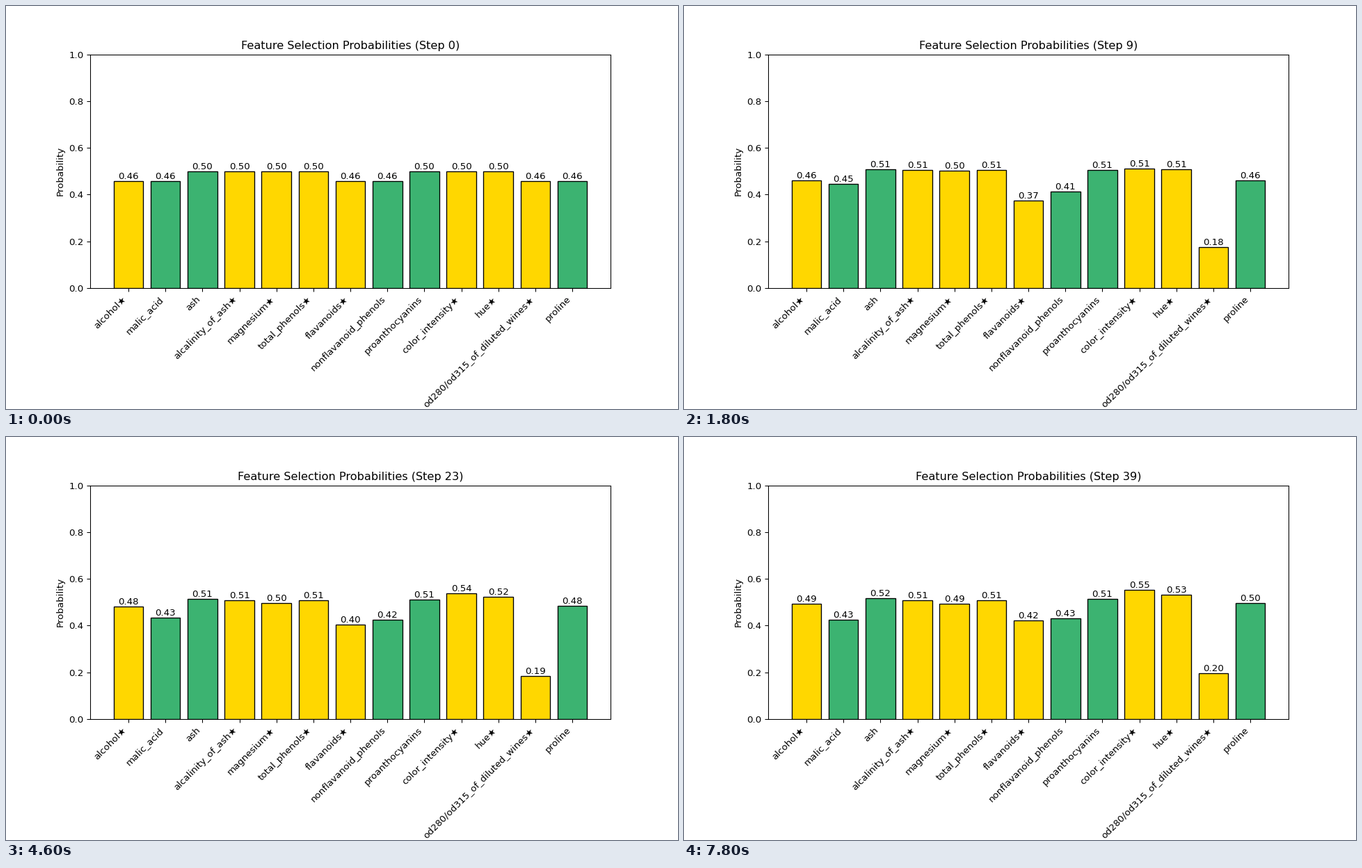
A matplotlib script for the animation above (8000 ms loop, 966x580 px).

```python
import matplotlib.pyplot as plt
import numpy as np
from matplotlib.animation import FuncAnimation

W, H, DPI = 966, 580, 96.6
STEPS, INTERVAL = 40, 200
FALL_TIME = 3      # steps in which the early change decays
DRIFT_START = 6    # step at which the slow drift begins

# name: (level after the early change, final level)
FEATURES = {
    "alcohol★": (.456, .4935),
    "malic_acid": (.4503, .4255),
    "ash": (.5055, .518),
    "alcalinity_of_ash★": (.505, .508),
    "magnesium★": (.503, .493),
    "total_phenols★": (.507, .508),
    "flavanoids★": (.359, .4225),
    "nonflavanoid_phenols": (.407, .431),
    "proanthocyanins": (.505, .514),
    "color_intensity★": (.503, .5515),
    "hue★": (.505, .532),
    "od280/od315_of_diluted_wines★": (.155, .1975),
    "proline": (.456, .4965),
}
settled, final = np.array(list(FEATURES.values())).T
start = np.where(settled > .5, .5, .457)


def probs_at(step):
    """Quick exponential change, then an eased drift to the final level."""
    early = np.exp(-step / FALL_TIME)
    u = max(0, (step - DRIFT_START) / (STEPS - 1 - DRIFT_START))
    drift = 1 - (1 - u) ** 1.7
    return settled + (start - settled) * early + (final - settled) * drift


plt.rcParams["font.family"] = "DejaVu Sans"
# The small margin keeps the pixel size from being truncated.
fig, ax = plt.subplots(figsize=((W + 1e-6) / DPI, (H + 1e-6) / DPI), dpi=DPI)
fig.subplots_adjust(left=0.125, right=0.9, bottom=0.3, top=0.88)

colors = ["gold" if name.endswith("★") else "mediumseagreen" for name in FEATURES]
xs = np.arange(len(FEATURES))
bars = ax.bar(xs, probs_at(0), color=colors, edgecolor="black")
labels = [ax.text(x, 0, "", ha="center", va="bottom", fontsize=10) for x in xs]
ax.set_ylim(0, 1)
ax.set_ylabel("Probability")
ax.set_xticks(xs)
ax.set_xticklabels(FEATURES, rotation=45, ha="right")
title = ax.set_title("")


def update(step):
    for bar, label, p in zip(bars, labels, probs_at(step)):
        bar.set_height(p)
        label.set_y(p)
        label.set_text(f"{p:.2f}")
    title.set_text(f"Feature Selection Probabilities (Step {step})")
    return [*bars, *labels, title]


anim = FuncAnimation(fig, update, frames=STEPS, interval=INTERVAL,
                     repeat=True, repeat_delay=0, blit=False)
plt.show()
```
